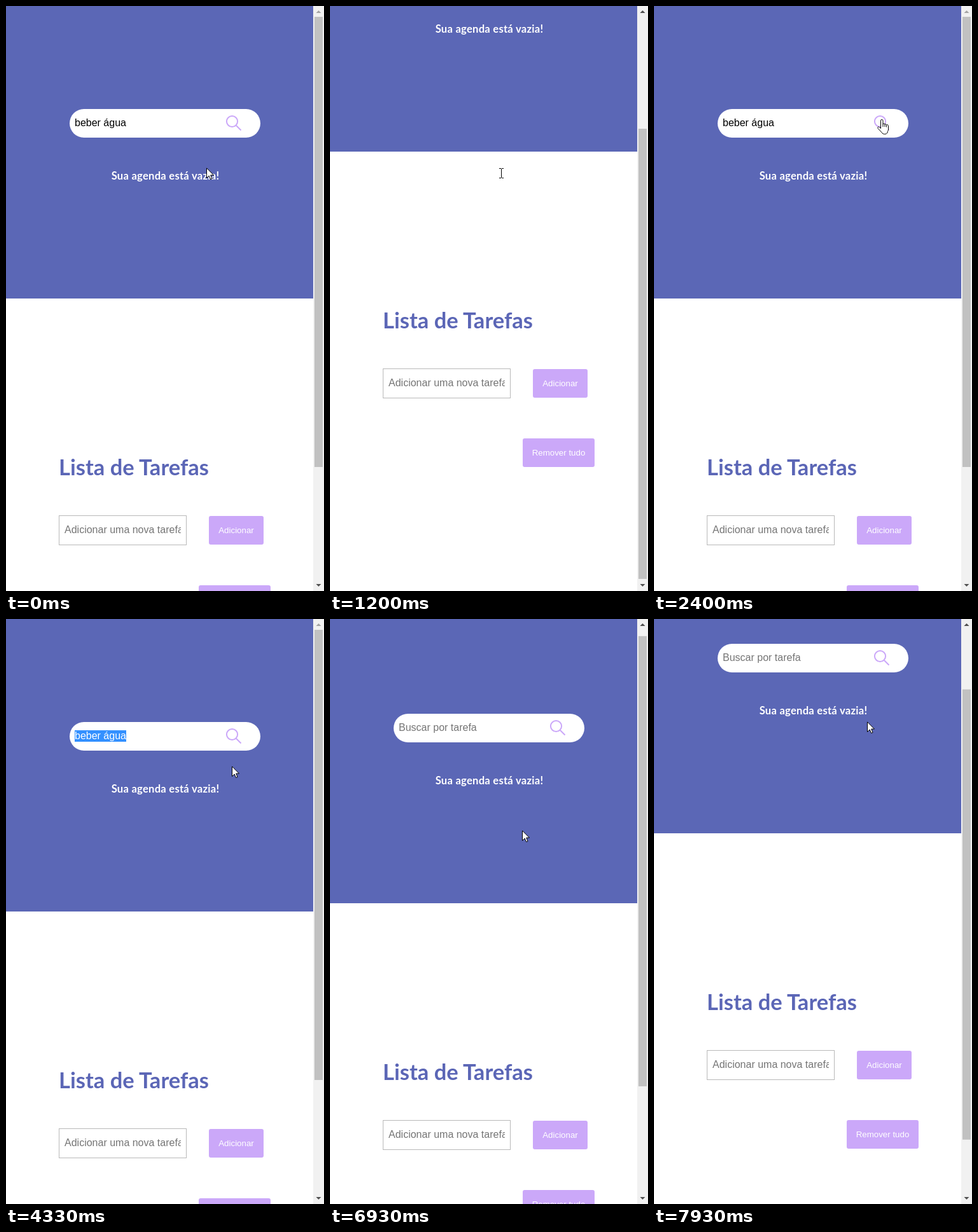
Animation of 500x920 px, one loop 8 s. Source, as an HTML page:

```html
<!DOCTYPE html>
<html lang="pt">
<head>
<meta charset="utf-8">
<title>Lista de Tarefas</title>
<style>
  @property --s { syntax: "<integer>"; inherits: true; initial-value: 0; }

  html, body { margin: 0; width: 100%; height: 100%; overflow: hidden; background: #fff; }
  .stage { display: block; width: 500px; height: 920px; animation: scroll 8s linear infinite; }

  text { font: 16px "Liberation Sans", Arial, sans-serif; white-space: pre; }
  .title, .note { font-family: Lato, "Open Sans", sans-serif; font-weight: 700; text-anchor: middle; }
  .title { font-size: 34.5px; fill: #5b66b6; }
  .note { font-size: 16.6px; letter-spacing: .25px; fill: #fff; }
  .hint { fill: #757575; }
  .btn rect { fill: #cba8f9; }
  .btn text { font-size: 13.333px; fill: #fff; text-anchor: middle; }

  .page { transform: translateY(calc(var(--s) * -1px)); }
  .thumb { fill: #c1c1c1; transform: translateY(calc(var(--s) * .762px)); }
  .up { opacity: min(1, var(--s)); }

  .typed { animation: typed 8s step-end infinite; }
  .empty { animation: empty 8s step-end infinite; }
  .caret { animation: caret 8s step-end infinite; }
  .wipe { animation: wipe 8s linear infinite; }
  .cursor { animation: move 8s linear infinite; }
  .shapes { animation: shape 8s step-end infinite; }

  /* page scroll offset in pixels */
  @keyframes scroll {
    0%, 6.8% { --s: 0; }
    7.5% { --s: 8; }
    9.1% { --s: 75; }
    10.9% { --s: 140; }
    12.5% { --s: 195; }
    14.1% { --s: 228; }
    14.9%, 15.8% { --s: 231; }
    16.7% { --s: 180; }
    17.5%, 18.1% { --s: 133; }
    19.1% { --s: 70; }
    20% { --s: 33; }
    21.3%, 85.9% { --s: 0; }
    86.6% { --s: 12; }
    87.5% { --s: 45; }
    88.3% { --s: 88; }
    89.1%, 89.6% { --s: 128; }
    90% { --s: 155; }
    90.9%, 97.6% { --s: 201; }
    98.4% { --s: 165; }
    99%, 100% { --s: 123; }
  }
  @keyframes move {
    0%, .4% { transform: translate(315px, 254px); }
    1.6% { transform: translate(306px, 290px); }
    2.5% { transform: translate(296px, 316px); }
    3.75% { transform: translate(278px, 290px); }
    4.9%, 21.6% { transform: translate(269px, 263px); }
    22.5% { transform: translate(278px, 248px); }
    24.4% { transform: translate(308px, 205px); }
    27.4%, 28.5% { transform: translate(348px, 174px); }
    29.6%, 35.4% { transform: translate(358px, 178px); }
    36.6% { transform: translate(345px, 206px); }
    39.1% { transform: translate(290px, 250px); }
    40.2% { transform: translate(250px, 255px); }
    41.6% { transform: translate(212px, 220px); }
    43.4% { transform: translate(176px, 185px); }
    45% { transform: translate(198px, 172px); }
    46.6% { transform: translate(200px, 180px); }
    47.1% { transform: translate(189px, 180px); }
    48.75% { transform: translate(108px, 182px); }
    49.8% { transform: translate(54px, 186px); }
    50.9% { transform: translate(70px, 200px); }
    52.5% { transform: translate(220px, 225px); }
    54%, 59.5% { transform: translate(355px, 231px); }
    62.5% { transform: translate(417px, 233px); }
    64.1% { transform: translate(405px, 215px); }
    65.9% { transform: translate(375px, 195px); }
    67.4%, 71.9% { transform: translate(358px, 183px); }
    72.4%, 72.9% { transform: translate(366px, 188px); }
    75% { transform: translate(350px, 240px); }
    77.5% { transform: translate(330px, 300px); }
    80% { transform: translate(310px, 354px); }
    82.4%, 94.4% { transform: translate(302px, 332px); }
    95% { transform: translate(306px, 305px); }
    96.6%, 100% { transform: translate(335px, 161px); }
  }
  /* strip of cursors: arrow 0, beam -40, hand -80 */
  @keyframes shape {
    0%, 22.1%, 36.6%, 50%, 74.1%, 100% { transform: translateX(0); }
    4.75%, 24.4%, 42.1% { transform: translateX(-40px); }
    26.6%, 65.4% { transform: translateX(-80px); }
  }
  @keyframes wipe {
    0%, 47.1% { transform: translateX(0); }
    48.75%, 100% { transform: translateX(-81px); }
  }
  @keyframes typed {
    0% { opacity: 1; }
    59.9%, 100% { opacity: 0; }
  }
  @keyframes empty {
    0% { opacity: 0; }
    59.9%, 100% { opacity: 1; }
  }
  @keyframes caret {
    0%, 66.6%, 82.4%, 94.9%, 100% { opacity: 0; }
    59.9%, 76.1%, 88.6% { opacity: 1; }
  }
</style>
</head>
<body>
<svg class="stage" viewBox="0 0 500 920">
  <defs>
    <clipPath id="selection"><rect class="wipe" x="189" y="175" width="81" height="18"/></clipPath>
    <clipPath id="field"><rect x="92" y="803" width="183" height="43"/></clipPath>
  </defs>

  <g class="page">
    <rect width="483" height="460" fill="#5b67b6"/>
    <rect x="100" y="162" width="300" height="45" rx="22.5" fill="#fff"/>
    <g class="typed">
      <text x="108" y="189">beber água</text>
      <g clip-path="url(#selection)">
        <rect x="108" y="175" width="81" height="18" fill="#3390ff"/>
        <text x="108" y="189" fill="#fff">beber água</text>
      </g>
    </g>
    <text class="hint empty" x="108" y="189">Buscar por tarefa</text>
    <rect class="caret" x="108" y="176" width="1" height="17"/>
    <g fill="none" stroke="#cba8f9" stroke-width="2">
      <circle cx="355.5" cy="181.5" r="8.6"/>
      <path d="M361.7 187.7L369.5 195.5"/>
    </g>
    <text class="note" x="250.5" y="273">Sua agenda está vazia!</text>

    <text class="title" x="201" y="738">Lista de Tarefas</text>
    <rect x="83.5" y="801.5" width="200" height="46" fill="#fff" stroke="#b9b9b9"/>
    <g clip-path="url(#field)"><text class="hint" x="92" y="829">Adicionar uma nova tarefa</text></g>
    <g class="btn">
      <rect x="319" y="802" width="86" height="45" rx="3"/>
      <text x="362" y="829">Adicionar</text>
      <rect x="303" y="911" width="113" height="45" rx="3"/>
      <text x="359.5" y="938">Remover tudo</text>
    </g>
  </g>

  <rect x="483" width="17" height="920" fill="#f1f1f1"/>
  <rect class="thumb" x="485" y="17" width="13" height="708"/>
  <path d="M487.5 11L491.5 7L495.5 11Z" fill="#a3a3a3"/>
  <path class="up" d="M487.5 11L491.5 7L495.5 11Z" fill="#505050"/>
  <path d="M487.5 909L491.5 913L495.5 909Z" fill="#505050"/>

  <g class="cursor">
    <svg x="-20" y="-12" width="40" height="40" overflow="hidden">
      <g class="shapes" fill="#fff" stroke="#000" stroke-width="1">
        <path transform="translate(20 12)" d="M.5 .9V16.5L4.2 13L6.6 18.5L9 17.5L6.7 12H11.5Z"/>
        <path transform="translate(60 12)" fill="none" d="M-3 -7.5H0M1 -7.5H4M.5 -7V7M-3 7.5H0M1 7.5H4"/>
        <g transform="translate(93 12)" stroke-linejoin="round">
          <path d="M5.5 14.5V2.3a1.75 1.75 0 0 1 3.5 0V8c0-1.5 3-1.5 3 .5c0-1.5 2.6-1 2.6 .8c.4-1 2.9-.8 2.9 1.2V16c0 2-1.5 3-1.5 5c-.8 3.2-7.6 3.2-8.5 .3L1.2 14.6c-1.5-1.8 .8-3.4 2.3-2z"/>
          <path fill="none" d="M9 8v4M12 8.5v3.5M14.6 9.5v3"/>
        </g>
      </g>
    </svg>
  </g>
</svg>
</body>
</html>
```
